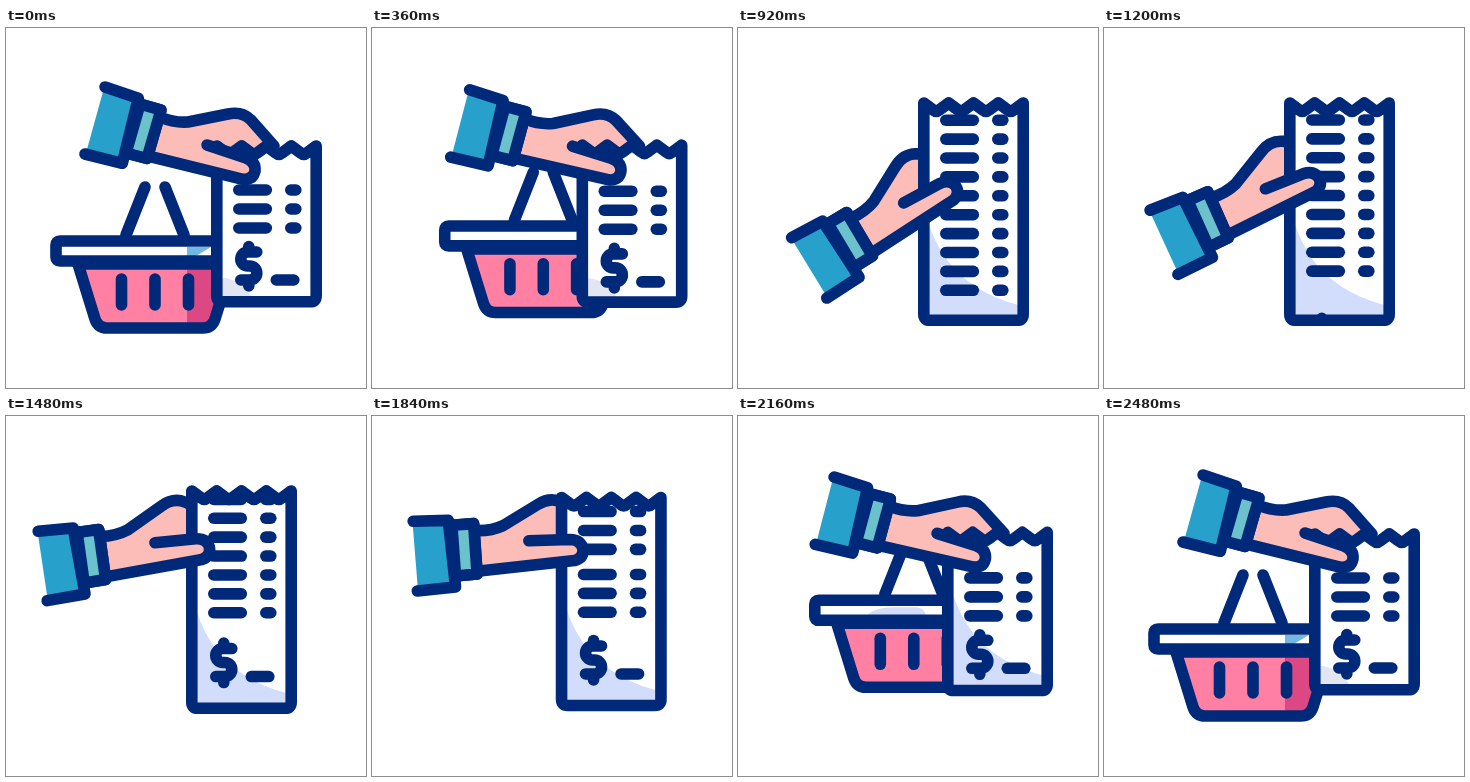
These frames come from a looping animation (360 by 360 pixels, 2800 ms). An HTML page with a canvas:

```html
<!DOCTYPE html>
<html lang="en">
<head>
<meta charset="utf-8">
<title>Receipt and basket</title>
<style>
html, body { margin: 0; width: 100%; height: 100%; overflow: hidden; background: #fff; }
canvas { display: block; width: 100vw; height: 100vh; }
</style>
</head>
<body>
<canvas id="stage"></canvas>
<script>
const LOOP = 2800, STEP = 40, LAST = 2480, LINE = 11.6;
const NAVY = '#00297a', SKIN = '#fcbcb8', BLUE = '#28a0cc', TEAL = '#6cc2cc';
const PINK = '#ff80a2', ROSE = '#dc4884', LILAC = '#d2dcfb';
const canvas = document.getElementById('stage');
const ctx = canvas.getContext('2d');

const lerp = (a, b, k) => a + (b - a) * k;
const mix = (p, q, k) => p.map((v, i) => lerp(v, q[i], k));
const ease = (t, from, to) => {
  const u = Math.min(1, Math.max(0, (t - from) / (to - from)));
  return (1 - Math.cos(Math.PI * u)) / 2;
};

function paint(path, fill, stroke) {
  const shape = typeof path === 'string' ? new Path2D(path) : path;
  if (fill) { ctx.fillStyle = fill; ctx.fill(shape); }
  if (stroke) { ctx.strokeStyle = stroke; ctx.stroke(shape); }
}
const bar = (x1, y1, x2, y2) => paint(`M${x1} ${y1}L${x2} ${y2}`, null, NAVY);

function faded(alpha, draw) {
  ctx.save();
  ctx.globalAlpha = alpha;
  draw();
  ctx.restore();
}

// Hand poses: pivot x, pivot y, rotation in degrees
const PIVOT = [170, 100];
const HAND_REST = [170, 100, 0];
const HAND_LOW = [132.1, 185.9, -46.8];
const HAND_MID = [113.4, 122.8, -23.6];

// Paper edges: left, top, bottom
const PAPER_REST = [210.8, 118, 273.8];
const PAPER_LONG = [185.8, 75, 292.3];
const PAPER_WIDTH = 99.4;

function drawBasket(t) {
  const leaving = t < 1240;
  const gone = leaving ? ease(t, 350, 580) : 1 - ease(t, 1920, 2130);
  if (gone > 0.99) return;
  const away = leaving ? ease(t, 0, 370) : 1 - ease(t, 2120, 2420);
  const shift = leaving ? [22, -15] : [28, -30];
  const center = mix([149 + shift[0] * away, 230 + shift[1] * away], [240, 190], gone);
  const shade = Math.max(0, 1 - away * 4);
  ctx.save();
  ctx.translate(...center);
  ctx.scale(1 - gone, 1 - gone);
  ctx.translate(-149, -230);

  bar(139, 159, 120, 207);
  bar(159, 159, 178, 207);
  const body = new Path2D('M72 236L89 291Q92 300 101 300H197Q206 300 209 291L226 236Z');
  paint(body, PINK);
  faded(shade, () => {
    ctx.clip(body);
    paint('M181 230H230V300H181Z', ROSE);
  });
  paint(body, null, NAVY);
  for (const x of [115.5, 149, 182.5]) bar(x, 251, x, 277);

  const rim = 'M54 213H244Q248 213 248 217V229Q248 233 244 233H54Q50 233 50 229V217Q50 213 54 213Z';
  paint(rim, '#fff');
  faded(shade, () => paint('M181 219H205L190 228H181Z', '#72b8e4'));
  if (!leaving) faded(away, () => paint('M102 228Q110 220 130 220H152Q160 221 161 228Z', LILAC));
  paint(rim, null, NAVY);
  ctx.restore();
}

function placeHand(pose, draw) {
  ctx.save();
  ctx.translate(pose[0], pose[1]);
  ctx.rotate(pose[2] * Math.PI / 180);
  ctx.translate(-PIVOT[0], -PIVOT[1]);
  draw();
  ctx.restore();
}

const drawBand = () => paint('M134 76L155 82L141 130.5L120 125Z', TEAL, NAVY);

function drawPalm() {
  paint('M154 89Q168 95 182 94L222 86Q236 83 245 92L268 118L255 136L240 148L143 129Z', SKIN);
  paint('M154 89Q168 95 182 94L222 86Q236 83 245 92L268 118', null, NAVY);
  paint('M98 60L132 71L116 135L80 125Z', BLUE);
  paint('M99 59L132.3 70.3L116.3 135.3L79 126', null, NAVY);
  drawBand();
}

function drawThumb() {
  paint('M201 117L240 130Q250 134 249 143Q247 152 237 151.3L150 130.5L160 112Z', SKIN);
  paint('M201 117L240 130Q250 134 249 143Q247 152 237 151.3L142 128', null, NAVY);
  drawBand();
}

function drawDollar(x, y) {
  paint(`M${x + 8} ${y - 14}H${x - 1}A7 7 0 0 0 ${x - 1} ${y}H${x + 1}A7 7 0 0 1 ${x + 1} ${y + 14}H${x - 8}` +
    `M${x} ${y - 19.5}V${y - 14}M${x} ${y + 14}V${y + 20}`, null, NAVY);
}

function sheetPath(left, top, bottom) {
  const right = left + PAPER_WIDTH, tooth = PAPER_WIDTH / 4, r = 6;
  let d = `M${left} ${top}`;
  for (let i = 0; i < 4; i++) {
    const x = left + i * tooth, mid = x + tooth / 2;
    d += `L${mid - 3} ${top + 7}Q${mid} ${top + 9.5} ${mid + 3} ${top + 7}L${x + tooth} ${top}`;
  }
  return new Path2D(d + `V${bottom - r}Q${right} ${bottom} ${right - r} ${bottom}` +
    `H${left + r}Q${left} ${bottom} ${left} ${bottom - r}Z`);
}

function drawPaper(t, open, scroll) {
  const [left, top, bottom] = mix(PAPER_REST, PAPER_LONG, open);
  const sheet = sheetPath(left, top, bottom);
  paint(sheet, '#fff');
  ctx.save();
  ctx.clip(sheet);

  const grow = ease(t, 380, 620) * (1 - ease(t, 2170, 2400));
  const w = lerp(36, 100, grow), h = lerp(24, 116, grow);
  paint(`M${left} ${bottom - h}Q${left + lerp(22, 16, grow)} ${bottom - lerp(26, 33, grow)} ` +
    `${left + w} ${bottom - lerp(3, 14, grow)}V${bottom}H${left}Z`, grow < 0.05 ? '#e3e5f2' : LILAC);

  const pitch = 18.9;
  const firstLong = lerp(224.5, 157.8, scroll);
  for (let i = -9; i < 3; i++) {
    const rest = i < 0 ? 102 + (i + 1) * pitch : 162 + i * 19;
    const y = lerp(rest, firstLong + i * pitch, open);
    bar(left + 22, y, left + 49.5, y);
    bar(left + 74, y, left + 79, y);
  }
  const total = lerp(238, lerp(336, 245, scroll), open);
  drawDollar(left + 32, total);
  bar(left + 59.5, total + 14, left + 77, total + 14);
  ctx.restore();
  paint(sheet, null, NAVY);
}

function draw(t) {
  const open = t < 1240 ? ease(t, 322, 748) : 1 - ease(t, 1709, 2226);
  const scroll = ease(t, 1019, 1522);
  const hand = mix(HAND_REST, mix(HAND_LOW, HAND_MID, scroll), open);
  ctx.fillStyle = '#fff';
  ctx.fillRect(0, 0, 360, 360);
  ctx.lineWidth = LINE;
  ctx.lineCap = ctx.lineJoin = 'round';
  drawBasket(t);
  placeHand(hand, drawPalm);
  drawPaper(t, open, scroll);
  placeHand(hand, drawThumb);
}

function frame() {
  const scale = window.devicePixelRatio || 1;
  const w = Math.round(innerWidth * scale), h = Math.round(innerHeight * scale);
  if (canvas.width !== w || canvas.height !== h) { canvas.width = w; canvas.height = h; }
  ctx.setTransform(w / 360, 0, 0, h / 360, 0, 0);
  const t = performance.now() % LOOP;
  draw(Math.min(LAST, Math.floor(t / STEP) * STEP));
  requestAnimationFrame(frame);
}
frame();
</script>
</body>
</html>
```
